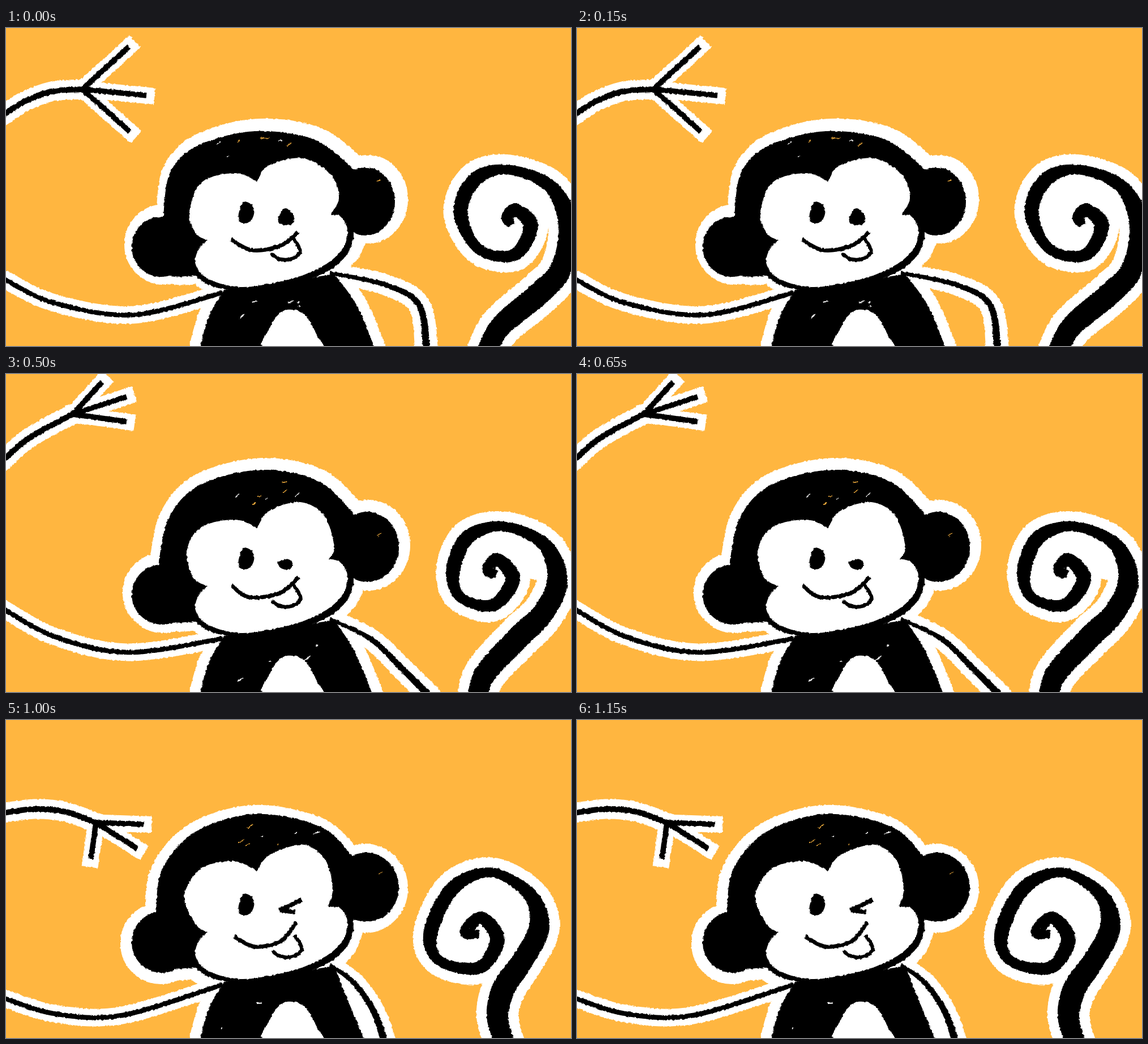
Write an HTML page that moves like this. It is 998x561 px and loops after 1250 ms.

```html
<!DOCTYPE html>
<html lang="en">
<head>
<meta charset="utf-8">
<title>Winking monkey</title>
<style>
html, body { margin: 0; width: 100%; height: 100%; overflow: hidden; background: #ffb640; }
svg { display: block; width: 100vw; height: 100vh; }
.pose { visibility: hidden; animation: show 1.25s step-end infinite; animation-delay: calc(var(--i) * .25s - 1.25s); }
@keyframes show { 0% { visibility: visible; } 20%, 100% { visibility: hidden; } }
path { stroke-linejoin: round; }
.white { fill: #fff; }
.halo { fill: #fff; stroke: #fff; }
.rim { fill: none; stroke: #fff; stroke-linecap: square; }
.line { fill: none; stroke: #000; }
.tongue { fill: #fff; stroke: #000; stroke-linecap: round; }
.fleck { fill: none; stroke: #fff; }
.spark { fill: none; stroke: #ffb640; }
</style>
</head>
<body>
<svg id="stage" viewBox="0 0 998 561" preserveAspectRatio="none">
  <filter id="rough" filterUnits="userSpaceOnUse" x="-10" y="-10" width="1018" height="581" color-interpolation-filters="sRGB">
    <feTurbulence type="fractalNoise" baseFrequency=".22" numOctaves="2" seed="4"/>
    <feDisplacementMap in="SourceGraphic" scale="4" xChannelSelector="R" yChannelSelector="G"/>
  </filter>
</svg>
<script>
// Shapes are "x y" points joined by a smooth curve; "|" marks a corner, ";" a new piece.
const chin = "614 372 | 602 400 575 425 535 443 480 457 415 463 365 456 333 437 | 298 439 265 425";
const muzzle = "590 332 603 355 597 385 572 412 530 434 480 448 415 457 360 444 336 420 338 395 355 374";
const leftEye = "411 328 419 307 434 312 438 328 429 343 413 342";
const tongue = "470 404 485 412 505 411 519 400 516 388 508 376";
const belly = "457 566 465 530 484 503 505 497 530 508 549 542 555 566";
const tailWidths = [14, 22, 22, 26, 22, 18, 25, 25, 17, 24, 36, 38, 41, 38, 34];
const armWidths = [6, 9, 11, 13];

const numbers = s => s.trim().split(/\s+/).map(Number);
const pairs = s => {
  const list = numbers(s);
  return Array.from({ length: list.length / 2 }, (_, i) => list.slice(i * 2, i * 2 + 2));
};

// Catmull-Rom curve through the points as cubic Béziers.
function spline(points, loop) {
  const n = points.length;
  const at = i => points[loop ? (i + n) % n : Math.max(0, Math.min(n - 1, i))];
  let d = "";
  for (let i = 0; i < (loop ? n : n - 1); i++) {
    const [a, b, c, e] = [at(i - 1), at(i), at(i + 1), at(i + 2)];
    const p = [0, 1].map(k => b[k] + (c[k] - a[k]) / 6);
    const q = [0, 1].map(k => c[k] - (e[k] - b[k]) / 6);
    d += `C${p} ${q} ${c}`;
  }
  return d;
}

function outline(shape, closed) {
  return shape.split(";").map(piece => {
    const parts = piece.split("|").map(pairs);
    const loop = closed && parts.length === 1;
    let d = "M" + parts[0][0], last = [];
    for (const part of parts) {
      d += spline([...last, ...part], loop);
      last = part.slice(-1);
    }
    return d + (closed ? "Z" : "");
  }).join("");
}

// Band of changing width along a smooth centre line.
function ribbon(shape, widths, steps = 12) {
  const pts = pairs(shape).map((p, i) => [...p, widths[i]]), mid = [];
  const at = i => pts[Math.max(0, Math.min(pts.length - 1, i))];
  for (let i = 0; i < pts.length - 1; i++) {
    for (let s = 0; s < steps; s++) {
      const t = s / steps;
      mid.push([0, 1, 2].map(k => {
        const [a, b, c, e] = [at(i - 1)[k], at(i)[k], at(i + 1)[k], at(i + 2)[k]];
        return b + t * (c - a + t * (2 * a - 5 * b + 4 * c - e + t * (3 * (b - c) + e - a))) / 2;
      }));
    }
  }
  const left = [], right = [];
  mid.forEach(([x, y, w], i) => {
    const a = mid[Math.max(0, i - 1)], b = mid[Math.min(mid.length - 1, i + 1)];
    const angle = Math.atan2(b[1] - a[1], b[0] - a[0]);
    const dx = -Math.sin(angle) * w / 2, dy = Math.cos(angle) * w / 2;
    left.push([x + dx, y + dy]);
    right.unshift([x - dx, y - dy]);
  });
  return "M" + [...left, ...right].map(p => p.map(v => v.toFixed(1))).join("L") + "Z";
}

function random(seed) {
  return () => (seed = seed * 16807 % 2147483647) / 2147483647;
}

// Short slanted gaps left by the brush.
function flecks(rand, count, x, y, w, h) {
  let d = "";
  while (count--) {
    const len = 3 + rand() * 8;
    d += `M${x + rand() * w} ${y + rand() * h}l${len} ${-len * rand()}`;
  }
  return d;
}

const path = (kind, d, width = 0) => `<path class="${kind}" d="${d}" stroke-width="${width}"/>`;
const fill = (kind, shape, width) => path(kind, outline(shape, true), width);
const line = (shape, width, kind = "line") => path(kind, outline(shape), width);
const ellipse = (kind, [x, y, rx, ry], width = 0) =>
  `<ellipse class="${kind}" cx="${x}" cy="${y}" rx="${rx}" ry="${ry}" stroke-width="${width}"/>`;
const shift = (by, body) => `<g transform="translate(${by})">${body}</g>`;

const stage = document.getElementById("stage");
let count = 0;

function pose(p) {
  const rand = random(97 + count * 31);
  const hand = pairs(p.reach).pop().join(" ");
  const fingers = pairs(p.tips).map(tip => `${hand} ${tip.join(" ")}`).join(";");
  const skull = `${p.skull} | ${chin}`;
  const cusp = p.browRight.split("|")[0];
  const face = `${p.browRight} | ${muzzle} | ${p.browLeft} ${cusp}`;
  const torso = `385 462 | 358 510 342 566 | ${p.hip} 566 | ${p.hip - 32} 490 580 434 | 480 450 385 462`;
  const arm = `${p.arm} 382 467`;
  const rightArm = ribbon(`572 432 ${p.rightArm}`, armWidths);
  const tail = ribbon(p.tail, tailWidths);
  const curl = pairs(p.tail).slice(3, 11).flat().join(" ");
  const ears = [p.earLeft, p.earRight].map(numbers);

  const parts = [
    line(p.reach, 35, "rim"),
    line(fingers, 29, "rim"),
    line(p.reach, 10),
    line(fingers, 9.5),
    path("halo", tail, 36),
    fill("white", curl),
    path("black", tail),
    line(arm, 31, "rim"),
    path("halo", rightArm, 28),
    shift(p.halo, fill("halo", skull, 36) + ears.map(e => ellipse("halo", e, 36)).join("")),
    fill("halo", torso, 38),
    line(arm, 8.5),
    path("black", rightArm),
    fill("black", torso),
    path("fleck", flecks(rand, 5, 365, 470, 200, 75), 2),
    fill("white", belly),
    fill("black", skull),
    ...ears.map(e => ellipse("black", e)),
    path("fleck", flecks(rand, 3, 370, 195, 180, 35), 1.6),
    path("spark", flecks(rand, 4, 400, 190, 160, 45), 1.6),
    path("spark", flecks(rand, 1, 645, 260, 30, 30), 1.6),
    fill("white", face),
    fill("black", leftEye),
    p.wink ? line(p.wink, 8) : fill("black", p.eye),
    shift(p.tongue, line(tongue, 6.5, "tongue")),
    line(p.mouth, 7)
  ];
  stage.insertAdjacentHTML("beforeend",
    `<g class="pose" style="--i:${count++}"><g filter="url(#rough)">${parts.join("")}</g></g>`);
}

pose({
  reach: "-5 154 30 131 80 112 135 108",
  tips: "217 33 248 119 219 183",
  arm: "-5 442 85 485 225 506",
  rightArm: "670 453 730 489 743 572",
  skull: "278 331 290 255 340 207 440 182 545 197 614 249",
  earLeft: "274 386 52 53",
  earRight: "635 306 52 60",
  browRight: "443 271 | 465 242 525 230 575 260 588 300 573 330",
  browLeft: "335 362 324 325 346 272 405 256",
  eye: "481 335 493 318 508 330 505 346 485 346",
  mouth: "397 373 435 392 485 384 516 360",
  tongue: "0 -4",
  hip: 652,
  halo: "5 -4",
  tail: "893 348 886 334 901 321 927 350 898 400 835 390 803 325 830 266 888 250 962 280 994 350 980 425 940 470 875 525 848 572"
});

pose({
  reach: "-5 155 40 120 80 97 125 76",
  tips: "216 23 233 48 240 85",
  arm: "-5 418 85 468 215 496",
  rightArm: "640 450 708 508 754 572",
  skull: "262 335 283 262 335 198 440 166 555 187 618 243",
  earLeft: "273 384 50 50",
  earRight: "645 299 56 63",
  browRight: "446 268 | 468 239 520 224 562 247 575 295 565 325",
  browLeft: "345 345 330 300 348 263 405 250",
  eye: "481 343 483 325 491 318 503 328 508 343",
  mouth: "397 374 435 393 490 382 515 362",
  tongue: "0 0",
  hip: 645,
  halo: "6 2",
  tail: "850 355 846 346 860 347 875 382 850 418 797 397 785 340 815 284 858 274 928 308 956 370 935 425 895 472 848 530 841 572"
});

pose({
  reach: "-5 152 35 117 75 93 118 71",
  tips: "170 14 213 40 213 84",
  arm: "-5 414 85 463 215 491",
  rightArm: "645 468 700 520 752 572",
  skull: "270 330 288 253 342 196 450 169 552 189 615 247",
  earLeft: "276 389 54 53",
  earRight: "638 305 56 62",
  browRight: "443 272 | 466 241 520 226 562 250 580 305 570 326",
  browLeft: "330 358 320 310 345 270 405 257",
  eye: "480 331 500 327 507 337 498 345 485 342",
  mouth: "398 373 430 394 485 386 517 358",
  tongue: "1 -2",
  hip: 648,
  halo: "2 -3",
  tail: "866 354 852 346 868 327 895 362 860 408 802 393 790 345 817 287 880 269 950 300 974 362 950 420 905 465 847 528 832 572"
});

pose({
  reach: "-5 154 50 132 110 122 185 123",
  tips: "274 112 289 148 257 183",
  arm: "-5 468 85 496 205 509",
  rightArm: "625 468 670 517 706 572",
  skull: "268 335 284 265 335 198 440 167 555 186 612 240",
  earLeft: "272 392 53 48",
  earRight: "645 297 58 62",
  browRight: "440 267 | 465 233 518 216 565 245 582 300 575 334",
  browLeft: "325 350 316 310 345 262 400 248",
  wink: "476 336 498 336; 484 333 509 320",
  mouth: "401 377 435 395 485 386 511 368",
  tongue: "1 2",
  hip: 634,
  halo: "-1 1",
  tail: "826 378 828 367 842 373 850 405 818 430 772 415 768 370 800 318 872 291 928 320 942 375 922 425 885 465 846 510 856 574"
});

pose({
  reach: "-5 164 50 157 105 162 159 181",
  tips: "243 184 232 227 150 245",
  arm: "-5 490 85 518 205 521",
  rightArm: "615 464 650 515 670 572",
  skull: "265 340 276 263 335 197 440 166 555 188 612 240",
  earLeft: "275 392 53 54",
  earRight: "636 295 58 61",
  browRight: "443 266 | 466 238 525 220 564 247 577 298 568 330",
  browLeft: "335 360 315 310 345 262 402 249",
  wink: "483 335 500 328 522 317; 484 335 510 339",
  mouth: "403 382 440 400 487 389 513 356",
  tongue: "3 6",
  hip: 634,
  halo: "-2 2",
  tail: "836 378 812 374 840 349 868 388 835 437 766 425 750 375 790 296 858 269 925 308 942 365 912 425 880 472 868 522 882 574"
});
</script>
</body>
</html>
```
